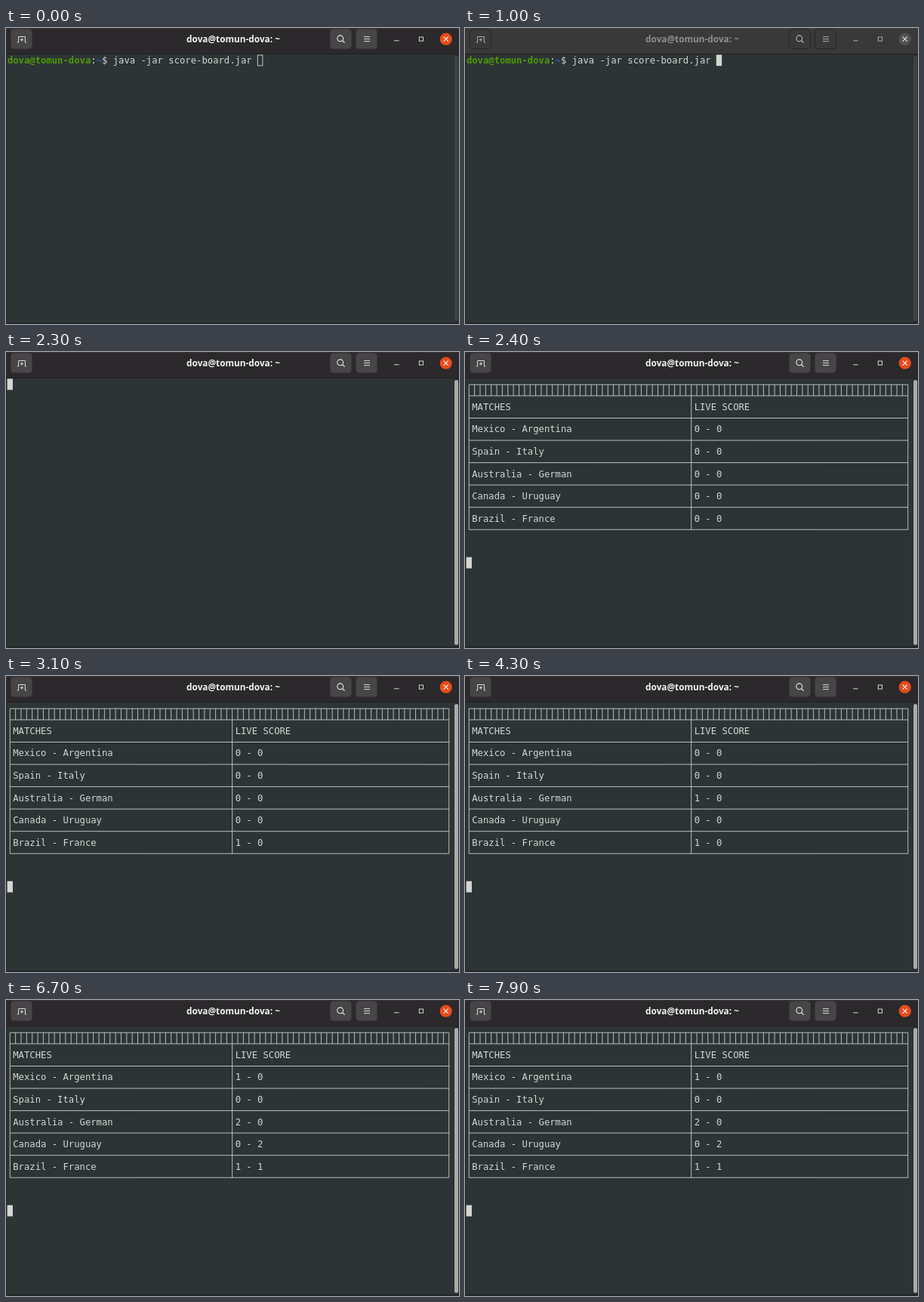
An HTML page with a canvas for the animation above (8 s loop, 600 by 392 pixels).

```html
<!DOCTYPE html>
<html lang="en">
<head>
<meta charset="utf-8">
<title>Terminal score board</title>
<style>
html, body { margin: 0; width: 100%; height: 100%; overflow: hidden; background: #2d3436; }
canvas { display: block; width: 600px; height: 392px; }
</style>
</head>
<body>
<canvas id="stage" width="600" height="392"></canvas>
<script>
const ctx = document.getElementById('stage').getContext('2d');

const LOOP = 8000, STEP = 100;
const CELL = 7.36, LINE = 14.77, LEFT = 1.6, TOP = 35.4;
const MONO = '12.225px "DejaVu Sans Mono", monospace';
const TITLE = 'bold 11.8px "Open Sans", sans-serif';
const BG = '#2d3436', FG = '#d3d7cf', RULE = '#c9cdc7', RULE_WIDTH = 0.9;
const HOST = 'dova@tomun-dova';

const REFOCUS = 1000, ENTER = 1900, CLEAR = 2200, TABLE = 2400, BLINK = 600;
const MATCHES = ['Mexico - Argentina', 'Spain - Italy', 'Australia - German',
                 'Canada - Uruguay', 'Brazil - France'];
// time, match, side that scores
const GOALS = [[2900, 4, 0], [3700, 2, 0], [4900, 3, 1], [5600, 4, 1],
               [6100, 3, 1], [6400, 2, 0], [6500, 0, 0]];

const colX = c => LEFT + c * CELL;
const rowY = r => TOP + r * LINE;
// centre lines used by box-drawing characters
const ruleX = c => colX(c + 0.5);
const ruleY = r => rowY(r) + 7.8;

function mix(a, b, k) {
  return `rgb(${a.map((v, i) => Math.round(v + (b[i] - v) * k)).join(',')})`;
}

function box(x, y, w, h, color) {
  ctx.fillStyle = color;
  ctx.fillRect(x, y, w, h);
}

function strokePath(points, color, width = 1) {
  ctx.strokeStyle = color;
  ctx.lineWidth = width;
  ctx.beginPath();
  points.forEach(([x, y], i) => i ? ctx.lineTo(x, y) : ctx.moveTo(x, y));
  ctx.stroke();
}

function disc(x, y, r, color) {
  ctx.fillStyle = color;
  ctx.beginPath();
  ctx.arc(x, y, r, 0, Math.PI * 2);
  ctx.fill();
}

function print(text, col, row, color = FG, bold = false) {
  ctx.font = (bold ? 'bold ' : '') + MONO;
  ctx.textAlign = 'left';
  ctx.fillStyle = color;
  ctx.fillText(text, colX(col) + 0.3, Math.round(rowY(row) + 12));
}

// 1 = focused window, 0 = backdrop
function focusAt(t) {
  if (t < 100) return 1;
  if (t < 200) return 0.3;
  if (t < 300) return 0.06;
  if (t < REFOCUS + 100) return 0;
  return t < REFOCUS + 200 ? 0.7 : 1;
}

function button(x, focus) {
  ctx.beginPath();
  ctx.roundRect(x + 0.5, 1.5, 28, 26, 4);
  ctx.fillStyle = mix([58, 57, 57], [71, 69, 71], focus);
  ctx.fill();
  ctx.strokeStyle = mix([40, 39, 39], [58, 56, 58], focus);
  ctx.lineWidth = 1;
  ctx.stroke();
}

function header(focus) {
  const ink = mix([184, 184, 183], [236, 236, 236], focus);
  box(0, 0, 600, 34, mix([58, 57, 57], [43, 41, 43], focus));
  box(0, 0, 600, 1, mix([66, 65, 65], [54, 52, 54], focus));
  box(0, 34, 600, 1, '#211f21');

  [6, 429, 463].forEach(x => button(x, focus));

  strokePath([[14.8, 19], [16.6, 19], [16.6, 11.5], [25.4, 11.5],
              [25.4, 19], [27.2, 19]], ink, 0.9);
  strokePath([[18.8, 15.6], [23.2, 15.6]], ink, 0.9);
  strokePath([[21, 13.4], [21, 17.8]], ink, 0.9);

  ctx.strokeStyle = ink;
  ctx.lineWidth = 1.1;
  ctx.beginPath();
  ctx.arc(442.7, 13.8, 3.9, 0, Math.PI * 2);
  ctx.stroke();
  strokePath([[445.6, 16.7], [448.6, 19.6]], ink, 1.2);

  [11.2, 14.2, 17.2].forEach(y => box(474, y, 8, 0.9, ink));
  box(514, 16.4, 6.6, 0.9, ink);
  ctx.strokeStyle = ink;
  ctx.lineWidth = 0.9;
  ctx.strokeRect(547.3, 12, 5.2, 5.2);

  disc(582.7, 14.7, 8.1, mix([83, 82, 82], [229, 76, 28], focus));
  const cross = mix([225, 225, 225], [255, 240, 232], focus);
  strokePath([[579.7, 11.7], [585.7, 17.7]], cross, 1.2);
  strokePath([[585.7, 11.7], [579.7, 17.7]], cross, 1.2);

  ctx.font = TITLE;
  ctx.textAlign = 'center';
  ctx.fillStyle = mix([143, 142, 140], [242, 242, 240], focus);
  ctx.fillText(HOST + ': ~', 301, 18.5);
}

function background() {
  box(0, 0, 600, 392, BG);
  box(0, 35, 1, 357, '#22282a');
  box(0, 390, 600, 2, '#23292b');
}

function scrollbar(t) {
  const shown = t < REFOCUS + 100 ? 0 : t < REFOCUS + 200 ? 0.7 : 1;
  box(593, 35, 7, 355, '#2a3032');
  ctx.beginPath();
  ctx.roundRect(594, 37, 5, 351, 2.5);
  ctx.fillStyle = mix([62, 66, 68], [170, 172, 170], shown);
  ctx.fill();
}

function cursor(t) {
  const row = t < ENTER ? 0 : t < CLEAR ? 1 : t < TABLE ? 0 : 16;
  const x = colX(t < ENTER ? 45 : 0), y = rowY(row);
  if (t < REFOCUS) {
    ctx.strokeStyle = FG;
    ctx.lineWidth = RULE_WIDTH;
    ctx.strokeRect(x + 0.5, y + 0.5, CELL - 0.8, LINE - 0.8);
    return;
  }
  const since = t < ENTER ? REFOCUS : ENTER;
  if (Math.floor((t - since) / BLINK) % 2 === 0) box(x, y, CELL, LINE, FG);
}

function prompt() {
  print(HOST, 0, 0, '#4e9a06', true);
  print(':', 15, 0);
  print('~', 16, 0, '#3465a4', true);
  print('$ java -jar score-board.jar', 17, 0);
}

function hRule(row) {
  strokePath([[ruleX(0), ruleY(row)], [ruleX(79), ruleY(row)]], RULE, RULE_WIDTH);
}

function vRule(col, from, to) {
  strokePath([[ruleX(col), ruleY(from)], [ruleX(col), ruleY(to)]], RULE, RULE_WIDTH);
}

function table(t) {
  hRule(0);
  for (let r = 1; r <= 13; r += 2) hRule(r);
  for (let c = 0; c < 80; c++) vRule(c, 0, c === 0 || c === 40 || c === 79 ? 13 : 1);

  print('MATCHES', 1, 2);
  print('LIVE SCORE', 41, 2);
  MATCHES.forEach((name, i) => {
    const score = side =>
      GOALS.filter(([at, m, s]) => at <= t && m === i && s === side).length;
    print(name, 1, 4 + 2 * i);
    print(`${score(0)} - ${score(1)}`, 41, 4 + 2 * i);
  });
}

function draw(t) {
  background();
  scrollbar(t);
  if (t < CLEAR) prompt();
  if (t >= TABLE) table(t);
  cursor(t);
  header(focusAt(t));
}

let start = null;
function tick(now) {
  if (start === null) start = now;
  const t = (now - start) % LOOP;
  draw(Math.floor(t / STEP) * STEP);
  requestAnimationFrame(tick);
}
draw(0);
requestAnimationFrame(tick);
</script>
</body>
</html>
```
